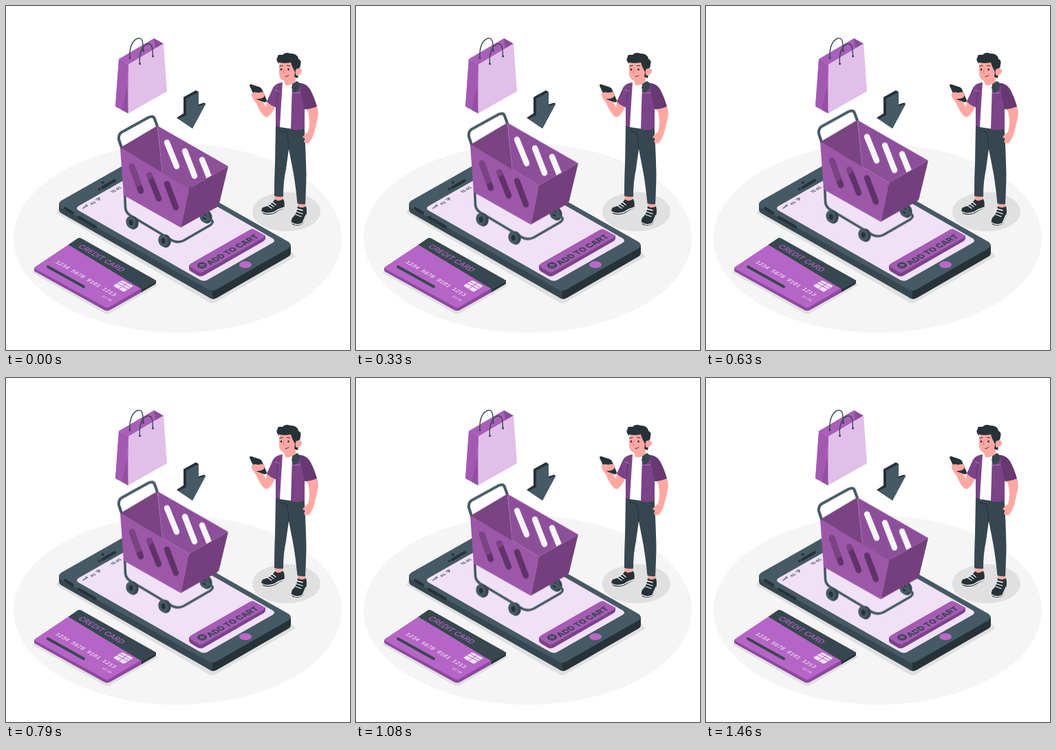
Animation of 500 by 500 pixels, one loop 1500 ms. Source, as an HTML page:

```html
<!DOCTYPE html>
<html lang="en">
<head>
<meta charset="utf-8">
<title>Add to cart</title>
<style>
html, body { margin: 0; width: 100%; height: 100%; overflow: hidden; background: #fff; }
svg { display: block; width: 100vw; height: 100vh; }
text { font-family: Inter, Roboto, sans-serif; }
.mono { font-family: "Liberation Mono", "DejaVu Sans Mono", monospace; fill: #fff; }
.line { fill: none; stroke-linecap: round; stroke-linejoin: round; }
.dark { fill: #37474f; }
.skin { fill: #ffa8a3; }
.cart { animation: float 1.5s linear infinite; }
@keyframes float {
  0%, 100% { transform: translateY(0); }
  50% { transform: translateY(-10px); }
}
</style>
</head>
<body>
<svg viewBox="0 0 500 500">
<defs>
  <clipPath id="backWall"><path d="M220 174 323 233 266 265 227 242Z"/></clipPath>
  <clipPath id="farSide"><path d="M160 283 250 226V200H160Z"/></clipPath>
  <path id="slots" class="line" stroke-width="8.5" d="M183 233 196 269M208.500 246 222 280M234 258.500 247 293"/>
  <g id="wheel">
    <ellipse cx="1.500" cy=".8" rx="8" ry="9.800" fill="#37474f" transform="rotate(-12)"/>
    <ellipse cx="-1.500" cy="-.6" rx="7" ry="9" fill="#455a64" transform="rotate(-12)"/>
    <ellipse cx="-1.300" cy="0" rx="3" ry="4" fill="#263238" transform="rotate(-12)"/>
  </g>
</defs>

<ellipse cx="249.500" cy="337.500" rx="238.500" ry="137.500" fill="#f5f5f5"/>
<ellipse cx="407.500" cy="299" rx="49.500" ry="28.500" fill="#e0e0e0"/>

<g id="phone">
  <path fill="#e0e0e0" d="M76 296 73 301 294 430Q300 434 306 430L421 364 414 356 300 420Z"/>
  <path class="dark" d="M77 287V296Q77 299 80 301L294 423Q297 426 301 426V411Z"/>
  <path fill="#263238" d="M300 412V426Q304 426 307 424L411 364Q414 362 414 359V348Z"/>
  <path fill="#455a64" d="M80 283 186 223Q192 219 199 223L411 343Q417 348 411 352L306 412Q300 415 294 412L80 293Q74 288 80 283Z"/>
  <path fill="#f0e1f5" d="M105 291 200 237Q206 234 212 237L388 338Q392 341 388 344L293 398Q288 401 282 398L105 297Q101 294 105 291Z"/>
  <g class="line" stroke="#263238">
    <path stroke-width="4" d="M140 264 158 253.500"/>
    <path stroke-width="4" d="M86 294 97 301M106 307 130 321"/>
    <path stroke-width="3.500" d="M135.500 266h.6M140.500 256.500h.6"/>
  </g>
  <ellipse cx="348" cy="376" rx="9" ry="5" fill="#ba68c8"/>
  <g class="line" stroke="#37474f">
    <path stroke-width="1.400" d="M112.500 294.500 111.500 293.500M114.600 293.300 113 292M116.700 292 114.600 290.500M118.800 290.800 116 288.800" stroke-linecap="butt"/>
    <path stroke-width="1" d="M130.500 281.500Q132 278.500 136 279M132.500 282Q133.500 280.500 136 280.500"/>
    <path stroke-width="1.500" d="M135.800 282h.2"/>
  </g>
  <text class="dark" font-size="5.500" font-weight="600" transform="matrix(.866 -.5 .866 .5 124.500 289.500)">4G</text>
  <text class="dark" font-size="6" font-weight="600" transform="matrix(.866 -.5 .866 .5 155 272)">15:45</text>

  <path fill="#7b4388" d="M266 377V382Q266 384 269 386L279 392Q283 394 287 392L374 342Q377 340 377 338V333Z"/>
  <path fill="#a65bb5" d="M269 374 354 325.500Q358 323 362 325.500L374 332Q378 335 374 337L287 386Q283 389 279 386L269 380Q264 377 269 374Z"/>
  <ellipse class="dark" cx="285" cy="377" rx="7" ry="4.600"/>
  <path class="line" stroke="#b568c4" stroke-width="1.500" d="M282 375.300 288 378.700M282 378.700 288 375.300"/>
  <text class="dark" font-size="12" font-weight="800" transform="matrix(.866 -.5 .866 .5 297 377)">ADD TO CART</text>
</g>

<g id="card">
  <path fill="#e0e0e0" d="M40 384 39 388 142 446Q147 449 152 446L221 406 217 401Z"/>
  <path fill="#8d48a0" d="M41 380V384Q41 386 44 387L143 442Q147 444 151 442L199 415V409Z"/>
  <path fill="#263238" d="M197 409V416L216 405Q218 404 218 402V398Z"/>
  <path fill="#b565c6" d="M44 378 92 346 198 409.500 151 437Q147 440 143 437L44 383Q39 381 44 378Z"/>
  <path class="dark" d="M90.500 347 103 338.500Q106 336 110 338L215 397Q220 400 215 402.500L198 412Z"/>
  <text fill="#b565c6" font-size="11" font-weight="500" transform="matrix(.866 .5 -.866 .5 104 350)">CREDIT CARD</text>
  <text class="mono" font-size="8.700" transform="matrix(.866 .5 -.866 .5 71 372.500)">1234 5678 9101 1213</text>
  <text class="mono" font-size="5" transform="matrix(.866 .5 -.866 .5 139 422)">12/25</text>
  <path class="line" stroke="#37474f" stroke-width="4" d="M61 379 113 408"/>
  <path fill="#f0e1f5" d="M158 405 167 399.500Q169 398.500 171 399.500L183 406Q185 407 183 408.500L173 414.500Q171 416 169 414.500L158 408Q155 406.500 158 405Z"/>
  <path class="line" stroke="#b565c6" stroke-width="1" d="M161 403 178 412M165 400.500 181 409.500M164 411 176 403M169 407 172 409"/>
</g>

<g id="bag">
  <path fill="#a95fb8" d="M164 77 215 47 229 55 178 85Z"/>
  <path fill="#8b4b99" d="M215 47 229 55 217 61Z"/>
  <path fill="#e1bfe8" d="M178 85 229 54.500 234 124 177.500 156Z"/>
  <path fill="#b56bc4" d="M164 77 178 85 177.500 156 159 146Z"/>
  <path fill="#a359b2" d="M178 85 176 113 168 150.500 159 146 164 77Z"/>
  <path fill="#92509f" d="M176.500 112 177.500 156 168 151Z"/>
  <g class="line" stroke="#37474f" stroke-width="1.400">
    <path d="M180 75C179 60 184 49 192 47C199 46 199 53 199.500 65"/>
    <path d="M194.500 84C193 69 198 57 206 55C213 54 213 62 213.500 73"/>
    <path stroke-width="3" d="M180 75.500h.1M199.500 65h.1M194.500 84h.1M213.500 73h.1"/>
  </g>
</g>

<g id="arrow">
  <path fill="#263238" d="M258 132.500 276 122.500 280 125 280 143 288 140.500 290 142 271 178 248 162.500 258 156Z"/>
  <path fill="#455a64" d="M262 134.500 280 125V145.500L290.500 142 271 178 251 164 262 158.500Z"/>
</g>

<g class="cart">
  <use href="#wheel" x="290" y="306"/>
  <g class="line" stroke="#455a64">
    <path stroke-width="3.600" d="M172.500 270 173.500 293Q174 300 180 304L237 338Q248 346 258 341L297 318.500Q303 314 298 311L282 302"/>
    <path stroke-width="4" d="M168 206 164 194Q163 186 169 183L207 162Q214 158.500 216 164L220 175"/>
  </g>
  <path fill="#7a4483" d="M166 206 220 174 227.500 243Z"/>
  <path fill="#8e4f9a" d="M220 174 323 233 266 265 227 242Z"/>
  <path class="line" stroke="#b98ac2" stroke-width=".7" stroke-dasharray="1 1.500" d="M220.500 175 227 241"/>
  <path class="line" clip-path="url(#backWall)" stroke="#f7f5f8" stroke-width="8.500" d="M234 198.500 248 233M260 211 274 247M285 223.500 299 258"/>
  <path fill="#9c57a9" d="M166 206 266 265 254 322 171 275Z"/>
  <path fill="#733f7c" d="M266 265 323 233 310 287Q309.500 290 307 292L254 322Z"/>
  <use href="#slots" stroke="#5f3368"/>
  <g clip-path="url(#farSide)"><use href="#slots" stroke="#7a4483"/></g>
  <use href="#wheel" x="183" y="314.500"/>
  <use href="#wheel" x="230" y="341"/>
</g>

<g id="man">
  <path class="skin" d="M390 273H402.500L402 285 391 286ZM424 284H435.500L435 296 424 296Z"/>
  <path fill="#263238" d="M391 281Q396 285 403 280.500Q406 287 404 294Q396 297 391 301Q382 305 374 302Q369 298 373 293Q385 290 391 281Z"/>
  <path fill="#263238" d="M424 291Q430 295 436 291Q438 298 436 306Q433 312 432 316Q426 321 417 318Q413 315 416 308Q423 302 424 291Z"/>
  <g class="line" stroke="#fff" stroke-width="1.300">
    <path d="M372 299Q378 303 389 300Q396 295 404 293"/>
    <path d="M415.500 315Q423 320 431 315.500L436 304"/>
    <path d="M380 290 386 294M383 287.500 389 291.500M387 285 392 289M421 303 429 306M422 299 431 302M423 295 431 297"/>
  </g>
  <path class="dark" d="M392 173H433.500C435 200 436 220 436.500 245Q436 270 435 288Q430 289 423.500 287Q421 262 418 244L411 208 407 237Q403 255 403 277Q396 278 390 276Q390 250 391 230Z"/>
  <path class="line" stroke="#263238" stroke-width="1" d="M397 180Q402 184 408 183Q411 195 411 208"/>

  <path class="skin" d="M432 146H452Q455 155 453 163L449 180Q446 193 440 199Q434 201 433 196L436 193 431 191Q433 187 439 183Q443 170 439 153Z"/>
  <path class="skin" d="M379 137 392 145Q388 154 382 160Q378 163 374 159Q368 152 364 142L358 133Q356 127 361 125L374 125Q378 130 375 136L374 140 378 147Z"/>
  <path fill="#263238" d="M354 116Q354 113 357 114L369 118Q371 119 372 121L379 137Q379 140 376 140L365 136Q363 135 362 133Z"/>
  <path class="skin" d="M357 127Q361 124 366 126L373 125Q377 128 375 132Q372 135 366 135Q360 136 357 131Z"/>

  <path fill="#fff" d="M399 113 418 111 418 179 398 176Z"/>
  <path class="skin" d="M403 105 421 99 421 110Q416 116 406 115Z"/>
  <path fill="#7b4388" d="M402 111Q392 112 388 119L379 139Q385 145 392 147L392 174 398 176Q400 140 402 111Z"/>
  <path fill="#7b4388" d="M416 113 428 112Q437 114 441 121L434 150V178Q424 182 414 179Z"/>
  <path fill="#673872" d="M428 112Q437 113 442 121Q448 132 452 146Q443 150 434 150L429 126Z"/>
  <path fill="#5f3368" d="M397 115 393 145 392 150 394 128Z"/>
  <path class="dark" d="M417 113 423 109 428 113 426 121 419 127 415 119Z"/>
  <path class="line" stroke="#b890c1" stroke-width=".8" d="M416 127 428 126M397 124 391 122"/>

  <path class="skin" d="M398 80Q396 90 397 99Q398 107 405 109Q416 109 421 101Q428 101 430 95Q430 89 423 91L421 78Z"/>
  <path fill="#263238" d="M397 84Q391 78 395 74Q394 70 402 71Q406 66 413 69Q424 69 425 77Q430 79 428 85Q428 91 424 91Q421 91 421 96L423 101 425 100 424 105 419 103 420 96 416 88 414 82Q405 84 397 82Z"/>
  <path class="skin" d="M422 92Q429 89 430 95Q428 101 422 101Q419 96 422 92Z"/>
  <g class="line" stroke="#263238">
    <path stroke-width="1.100" d="M398 87.500 402 86.500M408.500 86.500 413 87"/>
    <path stroke-width="2.600" d="M400 92v.5M410.500 92v.5"/>
    <path stroke-width="1" d="M406 102.500Q409 103 411 100.500"/>
    <path stroke="#ef7f7c" stroke-width="1" d="M404.500 91 402.500 97 405 97.500"/>
  </g>
</g>
</svg>
</body>
</html>
```
